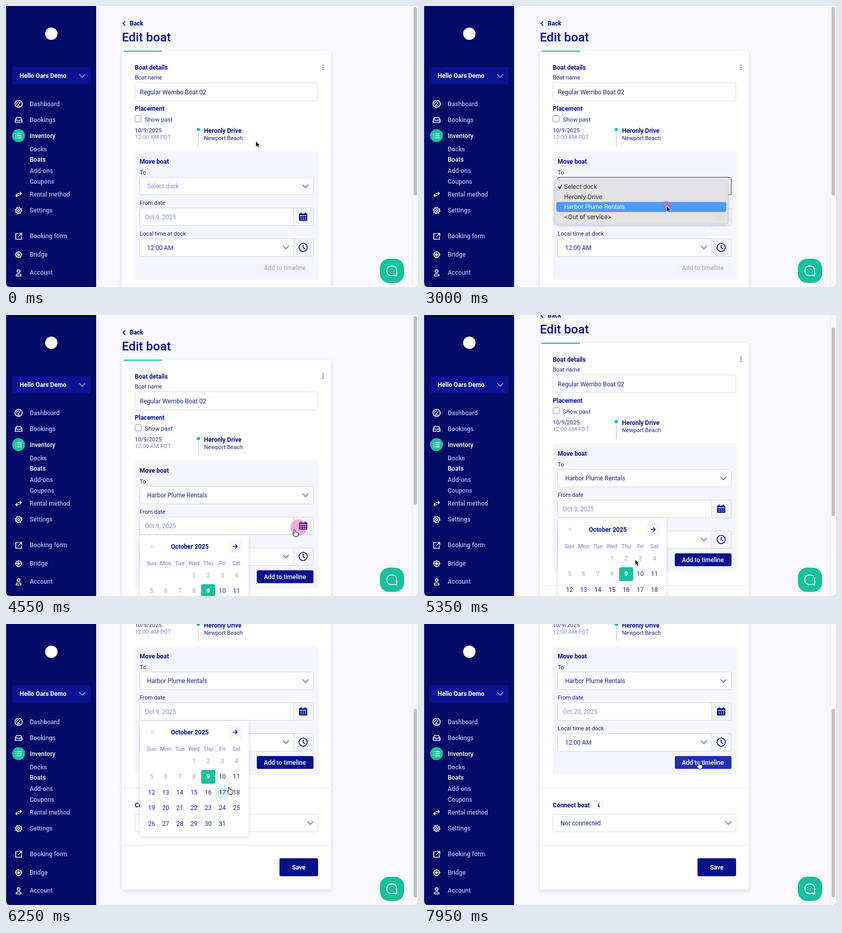
Animation, 800 px wide and 547 px high, one loop 8 s. Source, as an HTML page:

```html
<!DOCTYPE html>
<html lang="en">
<head>
<meta charset="utf-8">
<title>Edit boat</title>
<style>
  html, body { margin: 0; width: 100%; height: 100%; overflow: hidden; background: #f8f8fe; }
  svg { display: block; width: 100%; height: 100%; }
  text { font: 400 12px Roboto, sans-serif; fill: #16208c; }
  .small { font-size: 11px; }
  .bold { font-weight: 700; fill: #05108a; }
  .soft { fill: #8189d3; }
  .mid { text-anchor: middle; }
  .nav text { font-weight: 500; fill: #acb2e8; }
  .nav .on { fill: #fff; }
  .box { fill: #fff; stroke: #d3d6ee; }
  .side { fill: #f6f7fe; stroke: #d3d6ee; }
  .line { fill: none; stroke-width: 1.7; stroke-linecap: round; stroke-linejoin: round; }
  .nav .line { stroke: #f0f1ff; }
  .navy { stroke: #05108a; }
  .chev { stroke: #7b83cf; stroke-width: 2; }
  .menu text { font: 400 11.5px Inter, sans-serif; fill: #222; }
</style>
</head>
<body>
<svg viewBox="0 0 800 547">
  <defs>
    <filter id="shadow" x="-10%" y="-10%" width="120%" height="125%">
      <feDropShadow dx="0" dy="2" stdDeviation="3" flood-color="#1c2470" flood-opacity=".17"/>
    </filter>
    <path id="chevron" class="line chev" d="M-5.2-2.8 0 2.8 5.2-2.8"/>
  </defs>
  <rect width="800" height="547" fill="#f8f8fe"/>

  <g id="page">
    <path class="line navy" d="M231 30l-4 4 4 4"/>
    <text class="bold" x="240" y="38">Back</text>
    <text x="225" y="68.5" style="font-size:24px;font-weight:500;fill:#05108a">Edit boat</text>
    <rect x="225" y="87" width="406" height="670" rx="4" fill="#fff" filter="url(#shadow)"/>
    <path d="M227 89q1-2 3-2h73v2z" fill="#18c29c"/>

    <text class="bold" x="250" y="123.5">Boat details</text>
    <g fill="#05108a"><circle cx="615.5" cy="115" r="1.1"/><circle cx="615.5" cy="119" r="1.1"/><circle cx="615.5" cy="123" r="1.1"/></g>
    <text class="small" x="250" y="142.5">Boat name</text>
    <rect class="box" x="250.5" y="149.5" width="355" height="35" rx="3"/>
    <text x="260" y="171.5">Regular Wembo Boat 02</text>
    <text class="bold" x="250" y="203.5">Placement</text>
    <rect class="box" x="250.5" y="213.5" width="12" height="12" rx="2" style="stroke:#8087bf"/>
    <text x="269.5" y="224.5" style="font-size:11.6px">Show past</text>
    <text class="small" x="250" y="245.5">10/9/2025</text>
    <text class="small soft" x="250" y="259">12:00 AM PDT</text>
    <path d="M373.5 247v26" stroke="#c9cbd8" stroke-width="1.5"/>
    <circle cx="373.5" cy="240.5" r="3.3" fill="#18c29c"/>
    <text class="bold" x="384.5" y="247">Heronly Drive</text>
    <text class="small" x="384.5" y="260.5">Newport Beach</text>

    <rect x="250" y="283" width="356.5" height="250" rx="4" fill="#f5f5fd"/>
    <text class="bold" x="259.5" y="306.5">Move boat</text>
    <text class="small" x="259.5" y="327.5">To</text>
    <rect id="dockBox" class="box" x="259.5" y="333.5" width="337" height="34" rx="3"/>
    <text id="dock" x="274" y="355"></text>
    <use href="#chevron" x="581.5" y="351"/>

    <text class="small" x="259.5" y="386.5">From date</text>
    <rect class="box" x="259.5" y="393.5" width="337" height="34" rx="3"/>
    <path class="side" d="M558.5 393.5h35q3 0 3 3v28q0 3-3 3h-35z"/>
    <text id="date" class="soft" x="269.5" y="415"></text>
    <path d="M569 404h3v-2h2v2h6v-2h2v2h3v14h-16z" fill="#05108a"/>
    <path d="M570.5 408h13M572 411.5h2.2m2 0h2.2m2 0h2.2M572 415h2.2m2 0h2.2m2 0h2.2" stroke="#f6f7fe" stroke-width="1.6"/>

    <text class="small" x="259.5" y="446.5">Local time at dock</text>
    <rect class="box" x="259.5" y="453.5" width="337" height="34" rx="3"/>
    <path class="side" d="M558.5 453.5h35q3 0 3 3v28q0 3-3 3h-35z"/>
    <text x="274" y="474.5">12:00 AM</text>
    <use href="#chevron" x="543.5" y="470"/>
    <g class="line navy"><circle cx="577" cy="470" r="8"/><path d="M577 465.5v5l3 2"/></g>

    <rect id="addBox" x="487" y="497" width="110" height="25" rx="3"/>
    <text id="add" class="mid" x="541.5" y="513.5" style="font-weight:500">Add to timeline</text>

    <path d="M225 559.5h406M225 670.5h406" stroke="#dddff3"/>
    <text class="bold" x="250" y="596.5">Connect boat</text>
    <circle cx="339.5" cy="592" r="7.5" fill="#fff" stroke="#e6e7f5"/>
    <path d="M339.5 588.5v1.5M338 592h1.7v3.5m-1.9 0h3.6" stroke="#05108a" stroke-width="1.3" fill="none"/>
    <rect class="box" x="250.5" y="610.5" width="355" height="34" rx="3"/>
    <text x="265" y="632">Not connected</text>
    <use href="#chevron" x="591" y="627.5"/>
    <rect x="531" y="696" width="75" height="35" rx="3" fill="#05108a"/>
    <text class="bold mid" x="568.5" y="717.5" style="fill:#fff">Save</text>

    <g id="calendar">
      <rect x="260" y="429" width="211" height="224" rx="4" fill="#fff" filter="url(#shadow)"/>
      <rect x="433" y="438" width="25" height="25" rx="3" fill="#f5f5fd"/>
      <path class="line" d="M289 450.5h-8m3.5-3.5-3.5 3.5 3.5 3.5" stroke="#d8dae6"/>
      <path class="line navy" d="M441 450.5h8m-3.5-3.5 3.5 3.5-3.5 3.5"/>
      <text class="bold mid" x="357" y="454.5">October 2025</text>
      <rect id="dayHover" width="27" height="27" rx="3" fill="#e1f6f1"/>
      <rect x="379" y="524" width="27" height="27" rx="3" fill="#18c29c"/>
      <g id="days"></g>
    </g>
  </g>

  <g id="menu" class="menu">
    <rect x="253" y="338" width="338" height="87" rx="6" fill="#e4e3e4" fill-opacity=".98" stroke="#b9b9bd" stroke-width=".7" filter="url(#shadow)"/>
    <rect id="menuHover" x="257" width="330" height="19.6" rx="4" fill="#4b9dfb"/>
    <path id="check" class="line" d="M261 352.5l2.5 3 4-7" stroke-width="1.4"/>
  </g>

  <path d="M789.5 0v547" stroke="#e9e9ee"/>
  <rect x="790" width="10" height="547" fill="#fafafb"/>
  <rect id="thumb" x="791.5" y="2" width="6.5" height="367" rx="3.2" fill="#c1c1c3"/>

  <rect width="175" height="547" fill="#040a68"/>
  <circle cx="88" cy="54" r="12" fill="#fff"/>
  <rect x="12" y="119" width="152" height="34" rx="2" fill="#071390"/>
  <text class="bold" x="26.5" y="140" style="fill:#fff">Hello Oars Demo</text>
  <use href="#chevron" x="148" y="136"/>
  <g class="nav">
    <g id="nav"></g>
    <circle cx="24.3" cy="252.3" r="12.5" fill="#18c29c"/>
    <g class="line">
      <circle cx="24.5" cy="190.5" r="7"/><path d="M23.5 192.5l4-4.5M20.5 191q.5-4 4-4.5M22 194.5h5"/>
      <path d="M18 222l2.5-5h8l2.5 5v4.5H18zM18 222h4q2.5 3 5 0h4"/>
      <path d="M22.5 248.5h7.5m-7.5 4h7.5m-7.5 4h7.5M19 248.5h.2m-.2 4h.2m-.2 4h.2" style="stroke:#fff"/>
      <path d="M23.5 365h6.5m-2.5-2.5 2.5 2.5-2.5 2.5M25 369h-6m2.5-2.5L19 369l2.5 2.5"/>
      <circle cx="24.5" cy="398" r="2"/><circle cx="24.5" cy="398" r="5.2"/>
      <circle cx="24.5" cy="398" r="6.5" stroke-dasharray="2 3.105" style="stroke-linecap:butt"/>
      <path d="M23.5 443h-4.5v11h11v-4.5M26 442.5h4.5v4.5m0-4.5-6.5 6.5"/>
      <circle cx="24.5" cy="484" r="5.5"/><circle cx="24.5" cy="484" r="1.5"/>
      <path d="M24.5 477v14M17.5 484h14M19.5 479l10 10m0-10-10 10" style="stroke-width:1"/>
      <circle cx="24.5" cy="516" r="2.7"/><path d="M20 525.5v-1q0-3 3-3h3q3 0 3 3v1z"/>
    </g>
  </g>

  <rect x="726" y="492" width="47" height="47" rx="18" fill="#18c09c"/>
  <path class="line" d="M758.5 525.5l-4.5-1.5q-2 .8-5 .8c-6.5 0-9.5-3-9.5-9.3s3-9.300 9.500-9.300 9.500 3 9.500 9.300z" stroke="#fff" stroke-width="2"/>
  <path d="M.5 0v547" stroke="#c8cad8" stroke-opacity=".3"/>
  <path d="M0 538q0 9 9 9H0zM800 538q0 9-9 9h9z" fill="#dcdde6"/>

  <circle id="ripple" fill="#e8559f"/>
  <g id="pointer">
    <path id="arrow" d="M0 0v11.5l2.7-2.5 1.8 4 2-.9-1.8-3.900h3.600z" fill="#000" stroke="#fff" stroke-width=".9"/>
    <path id="hand" d="M-1 0q1.200-1 2 .5L2 4.500q1.500-.8 2 .5 1.500-.5 1.900.6 1.700-.3 1.900 1.200l-.2 3-1.200 3.700H.5L-3 8.500q-1.200-2 .8-2l1.500 1z" fill="#fff" stroke="#111" stroke-width="1"/>
  </g>
</svg>
<script>
const DURATION = 8000;
const el = id => document.getElementById(id);
const set = (node, attrs) => { for (const k in attrs) node.setAttribute(k, attrs[k]); };
const show = (id, on) => el(id).style.display = on ? '' : 'none';

function addText(parent, str, x, y, cls = '', fill = '') {
  const node = document.createElementNS('http://www.w3.org/2000/svg', 'text');
  set(node, { x, y, class: cls });
  node.textContent = str;
  node.style.fill = fill;
  return parent.appendChild(node);
}

[['Dashboard', 190.5], ['Bookings', 222], ['Inventory', 252.5], ['Docks', 279], ['Boats', 299],
 ['Add-ons', 320.5], ['Coupons', 341.5], ['Rental method', 367], ['Settings', 398],
 ['Booking form', 448], ['Bridge', 483.5], ['Account', 519]].forEach(([label, y]) =>
  addText(el('nav'), label, 46, y + 4, /Inventory|Boats/.test(label) ? 'on' : ''));

// Calendar grid: October starts on a Wednesday
const COL = 27.5, ROW = 30.5, TODAY = 9;
const colX = c => 282.5 + COL * c, rowY = r => 506.3 + ROW * r;
['Sun', 'Mon', 'Tue', 'Wed', 'Thu', 'Fri', 'Sat'].forEach((d, c) =>
  addText(el('days'), d, colX(c), 487, 'mid small', '#6f78cc'));
for (let day = 1; day <= 31; day++) {
  const slot = day + 2;
  const fill = day < TODAY ? '#a3a5ae' : day === TODAY ? '#fff' : '#16208c';
  const node = addText(el('days'), day, colX(slot % 7), rowY(Math.floor(slot / 7)) + 4.2, 'mid', fill);
  if (day === TODAY) node.style.fontWeight = 700;
}

const DOCK = 'Harbor Plume Rentals';
const options = ['Select dock', 'Heronly Drive', DOCK, '<Out of service>']
  .map((label, i) => addText(el('menu'), label, 272, 356 + 19.6 * i));

// time, x, y
const path = [[0, 485, 263], [500, 485, 263], [1500, 482, 352], [2350, 482, 352], [2850, 471, 389],
  [3200, 471, 389], [4150, 570, 413], [4420, 569, 414], [4550, 560, 418], [5100, 410, 476],
  [5900, 410, 476], [6250, 433, 318], [6750, 310, 356], [7100, 310, 357], [7700, 533, 269], [8000, 533, 269]];
const clicks = [[2130, 482, 352], [2930, 471, 389], [4330, 568, 414], [6930, 310, 357]];
const OPEN_MENU = 2250, PICK_DOCK = 3150, OPEN_CALENDAR = 4450, PICK_DATE = 7080;

const clamp = v => Math.max(0, Math.min(1, v));
const smooth = v => (v = clamp(v), v * v * (3 - 2 * v));

function cursorAt(t) {
  const i = path.findIndex(p => p[0] > t);
  const [t0, x0, y0] = path[i - 1], [t1, x1, y1] = path[i];
  const k = smooth((t - t0) / (t1 - t0));
  return [x0 + (x1 - x0) * k, y0 + (y1 - y0) * k];
}

function draw(t) {
  const scroll = Math.round(240 * smooth((t - 5180) / 730));
  const [x, y] = cursorAt(t);
  const pageY = y + scroll;
  const inside = (x0, y0, x1, y1) => x >= x0 && x <= x1 && pageY >= y0 && pageY <= y1;
  const menuOpen = t >= OPEN_MENU && t < PICK_DOCK;
  const calendarOpen = t >= OPEN_CALENDAR && t < PICK_DATE;
  const dockChosen = t >= PICK_DOCK;

  set(el('page'), { transform: `translate(0 ${-scroll})` });
  set(el('thumb'), { y: 2 + scroll * 0.68 });

  const dockActive = menuOpen || inside(260, 334, 597, 367) && !dockChosen;
  el('dockBox').style.stroke = dockActive ? '#20244a' : '';
  el('dockBox').style.fill = dockActive ? '#f5f5fd' : '';
  el('dock').textContent = dockChosen ? DOCK : 'Select dock';
  el('dock').style.fill = dockChosen ? '' : '#8189d3';
  el('date').textContent = t < PICK_DATE ? 'Oct 9, 2025' : 'Oct 20, 2025';

  show('menu', menuOpen);
  const choice = Math.max(0, Math.min(3, Math.floor((y - 342) / 19.6)));
  set(el('menuHover'), { y: 342.2 + 19.6 * choice });
  options.forEach((o, i) => o.style.fill = i === choice ? '#fff' : '');
  el('check').style.stroke = choice === 0 ? '#fff' : '#222';

  show('calendar', calendarOpen);
  const col = Math.floor((x - 268.75) / COL), row = Math.floor((pageY - 492) / ROW);
  const day = row * 7 + col - 2;
  const overDay = calendarOpen && col >= 0 && col < 7 && day > TODAY && day <= 31;
  show('dayHover', overDay);
  set(el('dayHover'), { x: colX(col) - 13.5, y: rowY(row) - 13 });

  const overAdd = dockChosen && inside(487, 497, 597, 522);
  el('addBox').style.fill = overAdd ? '#222fb5' : dockChosen ? '#05108a' : '#f4f4fb';
  el('add').style.fill = dockChosen ? '#fff' : '#b2b4c1';

  const hand = overDay || overAdd || inside(558, 394, 597, 428);
  show('arrow', !hand);
  show('hand', hand);
  set(el('pointer'), { transform: `translate(${x} ${y})` });

  const click = clicks.find(c => t >= c[0] && t < c[0] + 340);
  show('ripple', click);
  if (click) {
    const age = t - click[0];
    set(el('ripple'), { cx: click[1], cy: click[2], r: 6 + 10 * clamp(age / 180),
      opacity: 0.45 * clamp(age / 80) * clamp((340 - age) / 110) });
  }
}

function frame() {
  draw(performance.now() % DURATION);
  requestAnimationFrame(frame);
}
frame();
</script>
</body>
</html>
```
